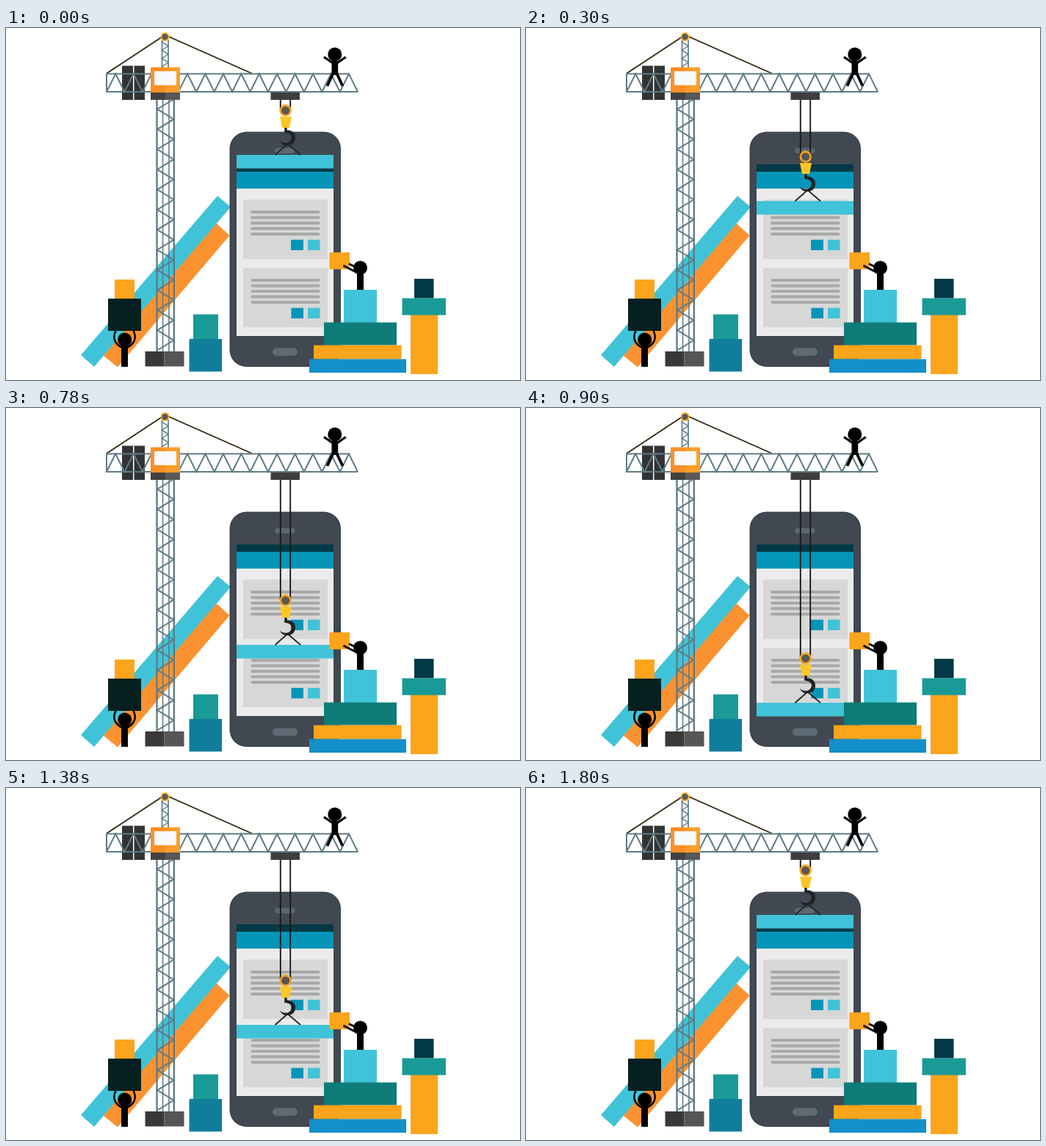
An HTML page with a canvas for the animation above (1.9 s loop, 700x480 px).

```html
<!DOCTYPE html>
<html lang="en">
<head>
<meta charset="utf-8">
<title>Crane building a phone app</title>
<style>
html, body { margin: 0; width: 100%; height: 100%; overflow: hidden; background: #fff; }
canvas { display: block; width: 700px; height: 480px; }
</style>
</head>
<body>
<canvas id="stage" width="700" height="480"></canvas>
<script>
const ctx = document.getElementById('stage').getContext('2d');

const LOOP = 1900, STEP = 300;
const DROPS = [0, 63, 150, 229, 150, 63, 0];

const ORANGE = '#fca41c', CYAN = '#40c3d8', BLUE = '#0495b8', NAVY = '#043a47';
const TEAL = '#199a96', STEEL = '#607b85', BLACK = '#000';

// Rectangle given by its edges
function box(color, x1, y1, x2, y2) {
  ctx.fillStyle = color;
  ctx.fillRect(x1, y1, x2 - x1, y2 - y1);
}

function pill(color, x1, y1, x2, y2, r) {
  ctx.fillStyle = color;
  ctx.beginPath();
  ctx.roundRect(x1, y1, x2 - x1, y2 - y1, r);
  ctx.fill();
}

function disc(color, x, y, r) {
  ctx.fillStyle = color;
  ctx.beginPath();
  ctx.arc(x, y, r, 0, Math.PI * 2);
  ctx.fill();
}

function trace(points) {
  ctx.beginPath();
  points.forEach(([x, y]) => ctx.lineTo(x, y));
}

function line(color, width, ...points) {
  ctx.strokeStyle = color;
  ctx.lineWidth = width;
  trace(points);
  ctx.stroke();
}

function poly(color, ...points) {
  ctx.fillStyle = color;
  trace(points);
  ctx.fill();
}

// Points alternating between two rails
function zigzag(count, at) {
  return Array.from({ length: count }, (_, i) => at(i, i % 2));
}

function beams() {
  poly('#fa9230', [286, 266], [304.5, 283], [152, 462.5], [132.5, 446.5]);
  poly(CYAN, [288, 229], [306, 244], [120, 462], [102, 446]);
}

function phone() {
  pill('#3a414b', 304.5, 141.5, 456, 462, 23);
  pill('#414851', 306, 143, 454.5, 460.5, 22);
  pill('#5b6771', 366, 163.5, 393.5, 171, 4);
  pill('#5e6a74', 363, 436.5, 397, 447, 5);
  box('#ebebeb', 314, 186, 446, 420);
  box(NAVY, 314, 186, 446, 196);
  box(BLUE, 314, 196, 446, 219);
  card(234, 0);
  card(327, 0.5);
}

function card(y, shift) {
  box('#d7d7d7', 323, y, 438, y + 81);
  for (let i = 0; i < 5; i++) {
    const ly = y + 15 + i * 7.5;
    pill('#a8a8a8', 333 + shift, ly, 427.5, ly + 4, 2);
  }
  box(BLUE, 388 + shift, y + 54.7, 405, y + 69);
  box(CYAN, 411, y + 54.7, 427.5, y + 69);
}

function tower() {
  for (const x of [213.5, 222]) line(STEEL, 1.6, [x, 98], [x, 441]);
  line(STEEL, 2, ...zigzag(26, (i, left) => [left ? 206 : 228.5, 97 + i * 13.7]));
  for (const x of [205.5, 228.8]) line(STEEL, 2.4, [x, 98], [x, 441]);
  box('#3b3839', 189.5, 441, 215.5, 461.5);
  box('#575657', 215.5, 441, 242.5, 461.5);
}

function jib() {
  box('#323334', 158, 51.5, 173, 98);
  box('#323334', 174.5, 51.5, 189, 98);
  line('#33280f', 1.9, [137, 62], [216.5, 9.5], [335, 62]);
  line(STEEL, 1.7, [212.5, 16], [212.5, 54]);
  line(STEEL, 1.7, [221, 16], [221, 54]);
  line(STEEL, 1.4, ...zigzag(7, (i, side) => [side ? 221 : 212.5, 19 + i * 5.6]));
  const pitch = 330 / 27;
  line(STEEL, 2, ...zigzag(28, (i, high) => [137 + i * pitch, high ? 62.5 : 87]), [479, 87]);
  line(STEEL, 2, [467, 62.5], [137, 62.5], [137, 87], [479, 87]);
  disc('#f7a823', 216.5, 12, 6);
  disc('#5a5858', 216.5, 12, 4);
  box('#fb8f28', 197, 53.5, 217, 88);
  box('#fb9e2b', 217, 53.5, 237, 88);
  box('#f8f9fc', 202, 59, 232, 78);
  box('#424142', 197, 88, 217, 98);
  box('#5a595a', 217, 88, 237, 98);
  box('#3d3d3e', 360.5, 88, 400, 98);
}

function hook(drop) {
  line('#171918', 1.9, [373.8, 98], [373.8, 112 + drop]);
  line('#171918', 1.9, [387.2, 98], [387.2, 112 + drop]);
  ctx.save();
  ctx.translate(0, drop);
  box(CYAN, 314, 173, 446, 191.5);
  line('#222524', 1.8, [366.5, 173], [383.5, 158], [401, 173]);
  disc('#f9a41e', 380.7, 112.5, 8.2);
  disc('#5a5753', 380.7, 112.5, 5.6);
  poly('#fdc627', [373, 121], [389, 121], [386, 136], [376, 136]);
  line('#202222', 3.4, [381, 136], [381, 142]);
  // Curved hook with a pointed left tip
  ctx.fillStyle = '#202222';
  ctx.beginPath();
  ctx.moveTo(379.3, 139.5);
  ctx.bezierCurveTo(390, 138, 394.5, 144, 394, 150.5);
  ctx.bezierCurveTo(393, 162.5, 376, 163, 373, 153.5);
  ctx.bezierCurveTo(376.5, 157, 382, 157.6, 385.5, 155.5);
  ctx.bezierCurveTo(391.5, 151.5, 390, 143, 379.5, 142.8);
  ctx.fill();
  ctx.restore();
}

function blocks() {
  box(ORANGE, 148, 343, 175, 369);
  box('#06201f', 139, 369, 184, 413);
  box(TEAL, 255, 390.5, 289, 424);
  box('#107d9a', 249.5, 424, 294, 468.5);
  box(ORANGE, 440.5, 306, 468, 329);
  box(CYAN, 460, 357, 505, 402);
  box('#0e7d79', 433, 401.5, 532, 432.5);
  box(ORANGE, 419, 432.5, 538.5, 451.5);
  box('#138fc9', 413, 451.5, 545, 470);
  box(NAVY, 556, 342, 582.5, 368.5);
  box(ORANGE, 551, 391, 588, 472);
  box(TEAL, 539.5, 368.5, 599, 391.5);
}

function lifter() {
  disc(BLACK, 161.7, 425, 9.5);
  pill(BLACK, 157, 431, 166, 462, [4, 4, 0, 0]);
  ctx.strokeStyle = BLACK;
  ctx.lineWidth = 2.6;
  for (const side of [-1, 1]) {
    ctx.beginPath();
    ctx.moveTo(161.5 + side * 12, 413);
    ctx.bezierCurveTo(161.5 + side * 16, 421, 161.5 + side * 15, 430, 161.5 + side * 3, 436);
    ctx.stroke();
  }
}

function stacker() {
  disc(BLACK, 482.5, 327, 9.5);
  pill(BLACK, 478, 332, 487, 357, [4, 4, 0, 0]);
  line(BLACK, 2.8, [459.5, 324], [480, 334.5]);
  line(BLACK, 2.8, [467, 321.5], [480, 328]);
}

function watcher() {
  disc(BLACK, 447.8, 36, 9.5);
  pill(BLACK, 443.5, 44, 452.2, 64, 3);
  line(BLACK, 3.2, [433, 39.5], [446, 48.5]);
  line(BLACK, 3.2, [462.8, 39.5], [450, 48.5]);
  line(BLACK, 3.8, [445.8, 61], [437.5, 79]);
  line(BLACK, 3.8, [450, 61], [458.5, 79]);
}

function draw(now) {
  const drop = DROPS[Math.floor((now % LOOP) / STEP)];
  box('#fff', 0, 0, 700, 480);
  beams();
  tower();
  phone();
  jib();
  hook(drop);
  blocks();
  lifter();
  stacker();
  watcher();
}

let start = null;
function tick(now) {
  if (start === null) start = now;
  draw(now - start);
  requestAnimationFrame(tick);
}
draw(0);
requestAnimationFrame(tick);
</script>
</body>
</html>
```
